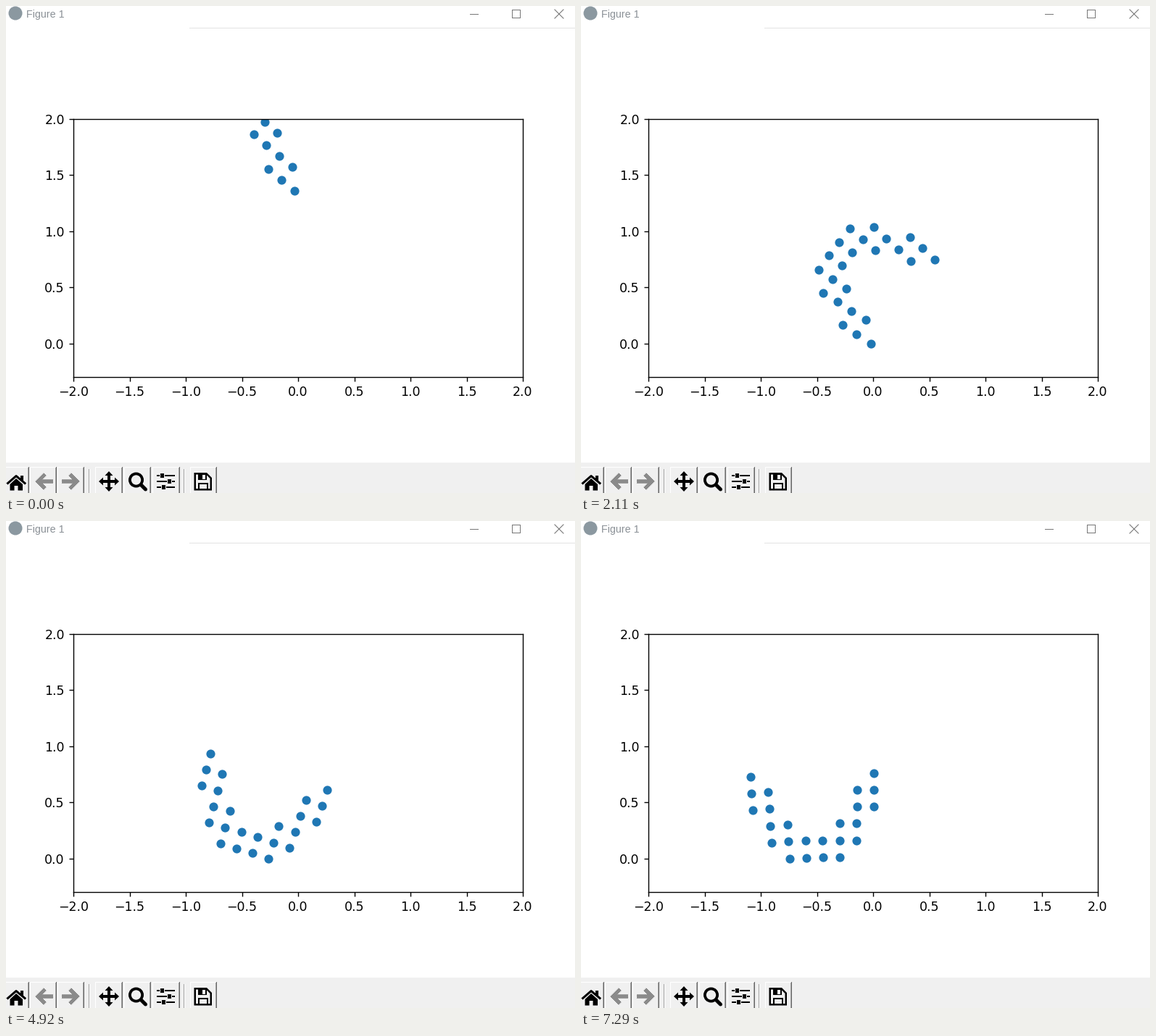
A matplotlib script for the animation above (7370 ms loop, 785 by 672 pixels).

```python
import matplotlib.pyplot as plt
import numpy as np
from matplotlib.animation import FuncAnimation
from matplotlib.patches import Circle, Polygon, Rectangle

W, H, DPI = 785, 672, 125
LOOP, TICK, STEPS = 7370, 22, 94   # ms per loop, ms per frame, poses per loop
LEAD = 36                          # ms by which a pose starts early
UNIT = 155                         # pixels per data unit
CELL = 0.15 * UNIT                 # rest spacing of the body
FLOOR = 465
GRAVITY = 0.596                    # pixels per step squared
FACE = "#f0f0f0"

# Filled rows in each column of the symmetric U
HALF = [(3, 6), (1, 5), (0, 3), (0, 2)]
ROWS = HALF + HALF[::-1]

# step, centre x, tilt and bend in degrees, from impact to rest
POSES = np.array([
    (18, 399.8, -130, 0),
    (27, 390.2, -127.4, -4.6),
    (48, 384.8, -64, -1.3),
    (63, 343.5, -17.2, 1.7),
    (79, 316.7, 4.7, 2.7),
    (86, 319.5, 0.5, 3.5),
    (93, 320.8, 1.5, 2.2),
])
KEYS, VALUES = POSES[:, 0], POSES[:, 1:]
SLOPES = np.gradient(VALUES, KEYS, axis=0)


def pose(step):
    """Cubic interpolation between the key poses; rigid before impact."""
    t = max(step, KEYS[0])
    i = min(np.searchsorted(KEYS, t, side="right") - 1, len(KEYS) - 2)
    span = KEYS[i + 1] - KEYS[i]
    u = (t - KEYS[i]) / span
    v = 1 - u
    return (VALUES[i] * (1 + 2 * u) * v * v + VALUES[i + 1] * u * u * (1 + 2 * v)
            + span * u * v * (SLOPES[i] * v - SLOPES[i + 1] * u))


def free_height(step):
    """Height of the centre in flight: first fall, then the rebound."""
    if step < 27:
        return 149.4 + 6.17 * step + GRAVITY / 2 * step ** 2
    t = step - 27
    return 366.5 - 3.8 * t + GRAVITY / 2 * t ** 2


def body(step):
    """Pixel positions of all nodes, y pointing down."""
    cx, tilt, bend = pose(step)
    side = np.linspace(-1.4, 1.4, len(ROWS)).clip(-1, 1)
    angle = np.radians(tilt + bend * side)
    mid = (angle[1:] + angle[:-1]) / 2
    base_x = np.append(0, -CELL * np.cos(mid).cumsum())
    base_y = np.append(0, CELL * np.sin(mid).cumsum())
    nodes = np.array([
        (base_x[c] - (r - 0.5) * CELL * np.sin(angle[c]),
         base_y[c] - (r - 0.5) * CELL * np.cos(angle[c]))
        for c, (low, high) in enumerate(ROWS) for r in range(low, high)])
    nodes -= nodes.mean(axis=0)
    cy = min(free_height(step), FLOOR - nodes[:, 1].max())
    return nodes + (cx, cy)


fig = plt.figure(figsize=(W / DPI, H / DPI), dpi=DPI, facecolor="white")
ui = fig.add_axes([0, 0, 1, 1])
ui.axis("off")


def box(x, y, w, h, color="black"):
    ui.add_patch(Rectangle((x, y), w, h, color=color, lw=0))


def poly(points, color="black"):
    return ui.add_patch(Polygon(points, color=color, lw=0))


def stroke(xs, ys, px, color="black", **kw):
    ui.plot(xs, ys, color=color, lw=px * 72 / DPI, **kw)


def title_bar():
    grey = "#777777"
    ui.add_patch(Circle((13, 10), 9.5, color="#8b98a0", lw=0))
    ui.text(28, 16, "Figure 1", family="Liberation Sans", size=8.2,
            color="#8a9096", va="baseline")
    box(640, 11, 12, 1, grey)
    box(698, 5, 12, 12, grey)
    box(699, 6, 10, 10, "white")
    stroke([757, 769], [5, 17], 1.1, grey)
    stroke([757, 769], [17, 5], 1.1, grey)
    box(253, 30, W - 253, 1, "#e3e3e3")


def button(left, right, top=636):
    box(left, top, right - left, 1, "white")
    box(left, top, 1, H - top, "white")
    box(right - 2, top + 1, 1, H - top, "#a0a0a0")
    box(right - 1, top, 1, H - top, "#696969")


def stippled_arrow(cx, side):
    upper = [(-12.5, 0), (-1, -11.5), (2.5, -8), (-3, -2.5), (12, -2.5)]
    shape = upper + [(x, -y) for x, y in upper[:0:-1]]
    outline = poly([(cx + side * x, 656 + y) for x, y in shape], "#808080")
    check = np.indices((28, 28)).sum(axis=0) % 2
    image = ui.imshow(check, cmap="gray", vmin=-0.8, vmax=1.6, aspect="auto",
                      interpolation="nearest", zorder=3,
                      extent=(cx - 14, cx + 14, 670, 642))
    image.set_clip_path(outline)


def home_icon():
    stroke([2.5, 14, 26], [658.5, 648.5, 658.5], 3)
    box(20, 647.5, 3.5, 7)
    poly([(14, 652), (23, 660), (23, 668.5), (16.5, 668.5), (16.5, 662),
          (11.5, 662), (11.5, 668.5), (5.5, 668.5), (5.5, 660)])


def pan_icon(cx=142, cy=656):
    box(cx - 10, cy - 1.8, 20, 3.6)
    box(cx - 1.8, cy - 10, 3.6, 20)
    head = np.array([(14, 0), (8, -5.5), (8, 5.5)])
    for turn in np.arange(4) * np.pi / 2:
        c, s = np.cos(turn), np.sin(turn)
        poly(head @ np.array([(c, s), (-s, c)]) + (cx, cy))


def zoom_icon():
    ui.add_patch(Circle((179.5, 654), 8.6, fill=False, ec="black",
                        lw=3.8 * 72 / DPI))
    stroke([186.5, 192.5], [661, 667], 5, solid_capstyle="round")


def sliders_icon():
    for y, knob in [(648, 215.3), (656, 225.7), (664, 217.4)]:
        box(208, y - 1, 25, 2)
        box(knob - 3.6, y - 3, 7.2, 6, FACE)
        box(knob - 2.6, y - 3, 5.2, 6)


def save_icon():
    poly([(259.5, 644), (277, 644), (284, 651), (284, 668.5), (259.5, 668.5)])
    poly([(262, 646.5), (276, 646.5), (281.5, 652), (281.5, 666),
          (262, 666)], FACE)
    box(264.5, 646, 12, 8)
    box(271, 647, 3.5, 5.5, FACE)
    box(264.5, 658, 14.5, 8.5)
    box(266.5, 660, 10.5, 6, FACE)


def toolbar():
    box(0, 630, W, H - 630, FACE)
    for left, right in [(-6, 32), (33, 70), (71, 108), (123, 161),
                        (163, 200), (202, 240), (254, 291)]:
        button(left, right)
    for x in (114, 245):
        box(x, 639, 1, H - 639, "#a0a0a0")
        box(x + 1, 639, 1, H - 639, "white")
    home_icon()
    stippled_arrow(53, 1)
    stippled_arrow(89, -1)
    pan_icon()
    zoom_icon()
    sliders_icon()
    save_icon()


title_bar()
toolbar()
ui.set(xlim=(0, W), ylim=(H, 0))

ax = fig.add_axes([93 / W, 160 / H, 620 / W, 356 / H])
ax.set(xlim=(-2, 2), ylim=(-0.3, 2),
       xticks=np.arange(-2, 2.1, 0.5), yticks=np.arange(0, 2.1, 0.5))
dots, = ax.plot([], [], "o", color="#1f77b4", ms=6)


def update(frame):
    step = min(int((frame * TICK + LEAD) * STEPS / LOOP), STEPS - 1)
    x, y = body(step).T
    dots.set_data((x - 403) / UNIT, (FLOOR - y) / UNIT)
    return dots,


anim = FuncAnimation(fig, update, frames=LOOP // TICK, interval=TICK,
                     repeat=True, repeat_delay=0)
plt.show()
```
